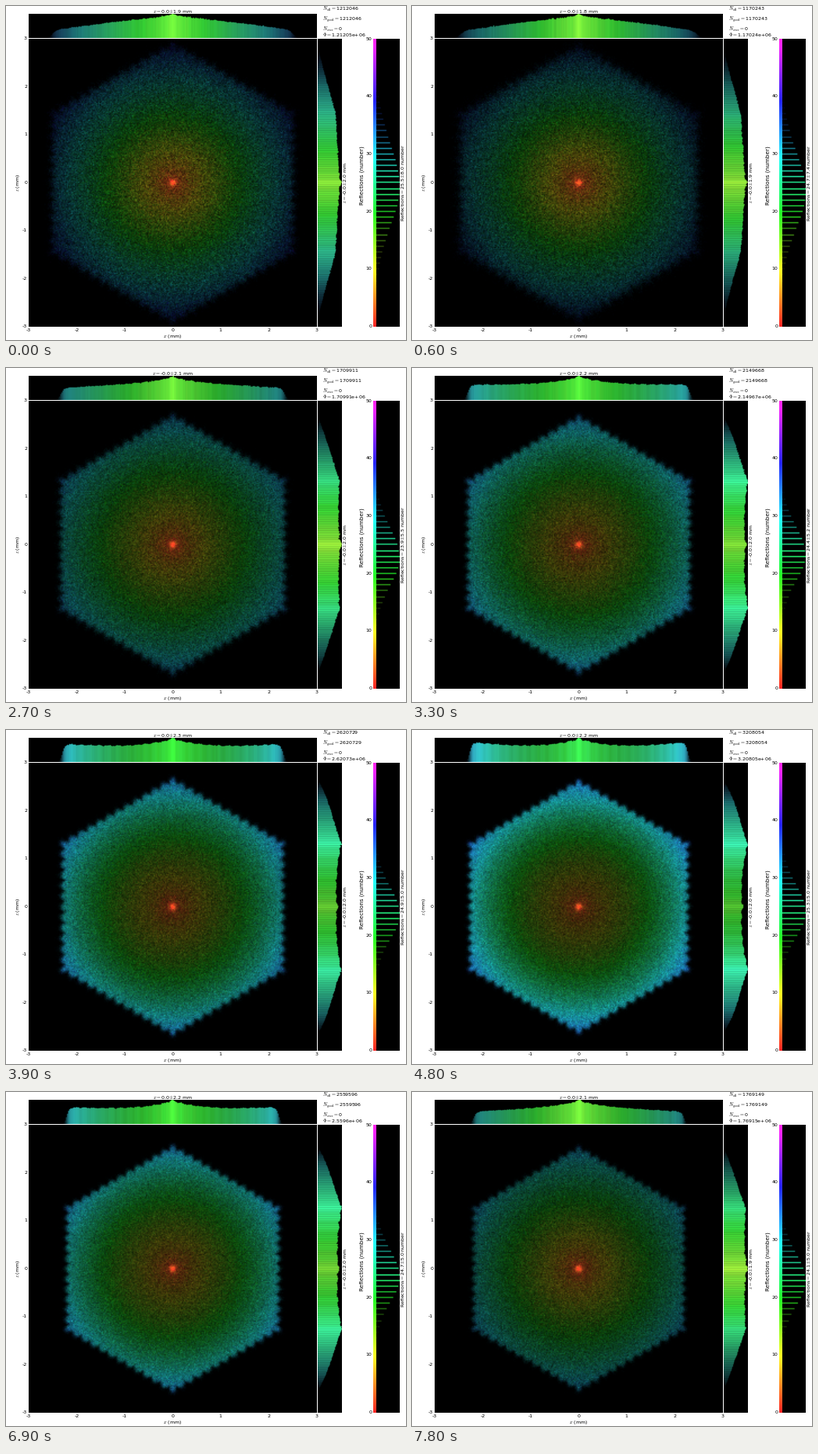
Animation, 512 px wide and 428 px high, one loop 8 s. Source, as a matplotlib script:

```python
import numpy as np
import matplotlib.pyplot as plt
from matplotlib.animation import FuncAnimation
from matplotlib.colors import hsv_to_rgb

W, H, DPI = 512, 428, 100
BINS, LEVELS = 256, 90
STEP_TICKS, TICKS, TICK_MS = 3, 80, 100

plt.rcParams.update({"font.family": "DejaVu Sans", "mathtext.fontset": "cm"})

# Measured stages of the scan: step index and the beam parameters there.
KEYS = np.array([0, 5, 9, 13, 16, 20, 26])
STAGES = {
    "rays": [1212046, 1195485, 1709911, 2620729, 3208054, 3154347, 1769149],
    "apothem": [2.50, 2.40, 2.32, 2.29, 2.26, 2.22, 2.18],
    "blur": [.035, .055, .030, .024, .022, .022, .022],
    "core": [.26, .24, .22, .19, .18, .185, .215],
    "rim": [.18, .16, .28, .48, .58, .56, .28],
    "rim_refl": [33, 30.5, 29, 29.5, 30, 29.5, 28.5],
    "x_width": [1.9, 1.7, 2.1, 2.3, 2.2, 2.2, 2.1],
    "z_width": [2.0, 1.8, 2.0, 2.0, 2.0, 2.0, 1.9],
    "refl": [25.5, 23.7, 23.9, 24.9, 25.3, 25.2, 24.1],
    "refl_width": [8.0, 6.5, 5.5, 5.0, 5.0, 5.0, 5.0],
}


def smooth(step, values):
    """Cubic Hermite interpolation through the stages."""
    values = np.array(values, float)
    slopes = np.gradient(values, KEYS)
    i = min(np.searchsorted(KEYS, step, side="right") - 1, len(KEYS) - 2)
    span = KEYS[i + 1] - KEYS[i]
    t = (step - KEYS[i]) / span
    return ((2*t**3 - 3*t**2 + 1) * values[i] + (t**3 - 2*t**2 + t) * span * slopes[i]
            + (3*t**2 - 2*t**3) * values[i + 1] + (t**3 - t**2) * span * slopes[i + 1])


def color(refl, value, saturation=.85):
    hue = .85 * np.clip(refl, 0, 50) / 50
    hue, sat, val = np.broadcast_arrays(hue, saturation, np.clip(value, 0, 1))
    return hsv_to_rgb(np.stack([hue, sat, val], axis=-1))


axis_mm = (np.arange(BINS) + .5) / BINS * 6 - 3
X, Z = np.meshgrid(axis_mm, -axis_mm)
R = np.hypot(X, Z)


def hexagon(apothem, blur):
    """Soft hexagonal mask whose sides are scalloped by the channel rows."""
    angles = np.radians([0, 60, 120])[:, None, None]
    across = np.abs(X * np.cos(angles) + Z * np.sin(angles))
    along = -X * np.sin(angles) + Z * np.cos(angles)
    side = across.argmax(axis=0)[None]
    distance = np.take_along_axis(across, side, 0)[0]
    t = np.take_along_axis(along, side, 0)[0]
    pitch = 2 * apothem / np.sqrt(3) / 12
    edge = apothem + .07 * (np.abs(np.cos(np.pi * t / pitch)) - .6)
    return 1 / (1 + np.exp(np.clip((distance - edge) / blur, -40, 40)))


def profile(counts, refl, axis):
    total = counts.sum(axis=axis)
    mean = (counts * refl).sum(axis=axis) / np.maximum(total, 1e-9)
    return total / total.max(), mean


def build(step):
    p = {name: smooth(step, values) for name, values in STAGES.items()}
    rng = np.random.default_rng(step + 1)
    u = R / p["apothem"]
    density = (p["core"] + (p["rim"] - p["core"]) * u**2.5
               + .25 * np.exp(-R / .25) + .7 * np.exp(-(R / .065)**2))
    density = np.maximum(density, 0) * hexagon(p["apothem"], p["blur"])
    scale = p["rays"] / density.sum() / 2
    hits = rng.poisson(density * scale)
    counts = hits / scale
    refl = 1.5 + (p["rim_refl"] - 1.5) * u**.95
    refl = refl + rng.normal(0, 6, R.shape) / np.sqrt(hits + 1)
    p["map"] = color(refl, counts)

    level = (np.arange(LEVELS) + .5) / LEVELS
    height, mean = profile(counts, refl, 0)
    p["top"] = color(mean, height * (level[::-1, None] < height), .75)
    height, mean = profile(counts, refl, 1)
    shade = np.where(np.arange(BINS) % 2, .87, 1) * height
    p["right"] = color(mean[:, None], shade[:, None] * (level < height[:, None]), .75)

    number = np.arange(51)
    offset = number - (p["refl"] - 1.3)
    sigma = p["refl_width"] / 1.18 * np.where(offset > 0, 1.12, 1)
    share = np.exp(-.5 * (offset / sigma)**2)
    share /= share.max()
    bars = np.zeros((BINS, LEVELS, 3))
    rows = BINS - 1 - np.minimum(number * BINS // 50, BINS - 1)
    bars[rows] = color(number[:, None], share[:, None] * (level < share[:, None]))
    p["bars"] = bars

    rays = int(round(p["rays"]))
    x_sign = "-" if 3 < step < 11 else ""
    z_sign = "" if 18 <= step < 23 else "-"
    p["texts"] = {
        "x": rf"$x=${x_sign}0.0$\pm${p['x_width']:.1f} mm",
        "z": rf"$z=${z_sign}0.0$\pm${p['z_width']:.1f} mm",
        "refl": rf"Reflections$=${p['refl']:.1f}$\pm${p['refl_width']:.1f} number",
        "all": rf"$N_{{\rm all}}=${rays}",
        "good": rf"$N_{{\rm good}}=${rays}",
        "flux": rf"$\Phi=${rays:.6g}",
    }
    return p


fig = plt.figure(figsize=(W / DPI, H / DPI), dpi=DPI, facecolor="white")
ax = fig.add_axes([0, 0, 1, 1])
ax.axis("off")


def label(x, y, text="", px=6.3, ha="center", va="center", rotation=0):
    return ax.text(x, y, text, fontsize=px * 72 / DPI, ha=ha, va=va, rotation=rotation)


def panel(left, right, top, bottom, data, interpolation="bilinear"):
    return ax.imshow(data, extent=(left, right, bottom, top), aspect="auto",
                     interpolation=interpolation)


states = [build(step) for step in range((TICKS - 1) // STEP_TICKS + 1)]
first = states[0]
panels = {
    "map": panel(29, 397.7, 42, 410.7, first["map"]),
    "top": panel(29, 397.7, 10.7, 41, first["top"]),
    "right": panel(399, 430, 42, 410.7, first["right"]),
    "bars": panel(474, 504, 42, 410.7, first["bars"]),
}
panel(470, 474, 42, 410.7, color(np.linspace(50, 0, BINS)[:, None], 1.))
ax.set_xlim(0, W)
ax.set_ylim(H, 0)

for v in range(-3, 4):
    label(213.3 + 61.45 * v, 415.3, str(v))
    label(27, 226.3 - 61.45 * v, str(v), ha="right")
for v in range(0, 51, 10):
    label(468.3, 410.7 - 7.374 * v, str(v), ha="right")
label(213.3, 423, "$x$ (mm)")
label(16, 226.3, "$z$ (mm)", rotation=90)
label(456, 217.5, "Reflections (number)", px=7.3, rotation=90)
label(405, 32.3, r"$N_{\rm over}=$0", ha="left", va="baseline")

texts = {
    "x": label(213.5, 6.7),
    "z": label(434, 226.3, rotation=90),
    "refl": label(507.5, 226.3, rotation=90),
    "all": label(405, 5.8, ha="left", va="baseline"),
    "good": label(405, 18.8, ha="left", va="baseline"),
    "flux": label(405, 39.3, ha="left", va="baseline"),
}


def update(tick):
    state = states[tick // STEP_TICKS]
    for name, image in panels.items():
        image.set_data(state[name])
    for name, text in texts.items():
        text.set_text(state["texts"][name])
    return [*panels.values(), *texts.values()]


anim = FuncAnimation(fig, update, frames=TICKS, interval=TICK_MS,
                     repeat=True, repeat_delay=0, blit=False)
plt.show()
```
